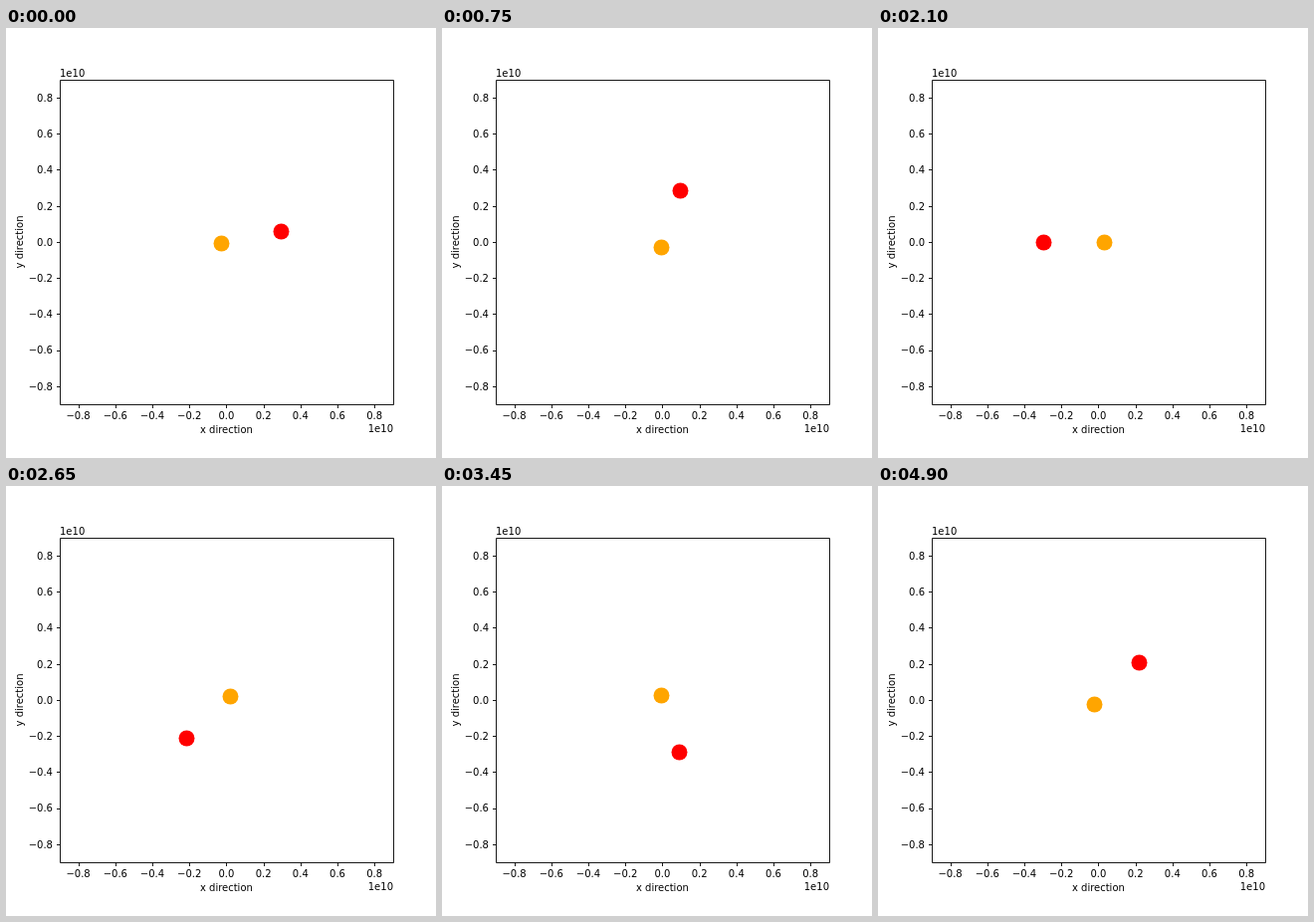
These frames come from a looping animation (432 by 432 pixels, 4950 ms). An HTML page:

```html
<!DOCTYPE html>
<html lang="en">
<head>
<meta charset="utf-8">
<title>Two-body orbit</title>
<style>
  html, body { margin: 0; width: 100%; height: 100%; overflow: hidden; background: #fff; }
  svg { display: block; width: 432px; height: 432px; }
  text { font: 10px "DejaVu Sans", sans-serif; }
  .axes { fill: none; stroke: #000; stroke-width: 0.9; }
</style>
</head>
<body>
<svg viewBox="0 0 432 432">
  <path id="axes" class="axes"/>
  <g id="labels">
    <text x="54" y="49">1e10</text>
    <text x="389" y="406" text-anchor="end">1e10</text>
    <text x="221.4" y="407" text-anchor="middle">x direction</text>
    <text transform="translate(17 215) rotate(-90)" text-anchor="middle">y direction</text>
  </g>
  <circle id="star" r="8" fill="orange"/>
  <circle id="planet" r="8" fill="red"/>
</svg>
<script>
const CENTER = { x: 221.4, y: 214.92 };
const SCALE = { x: 185.8, y: 180.8 };
const STEP = 50, STEPS = 99;
const $ = id => document.getElementById(id);
const rad = deg => deg * Math.PI / 180;
const snap = v => Math.floor(v + 0.5) + 0.5;

function addLabel(x, y, anchor, text) {
  const el = document.createElementNS($("labels").namespaceURI, "text");
  el.setAttribute("x", x);
  el.setAttribute("y", y);
  el.setAttribute("text-anchor", anchor);
  el.textContent = text;
  $("labels").append(el);
}

function drawAxes() {
  let path = "M54.5 52.5H389.5V378.5H54.5Z";
  for (let i = -4; i <= 4; i++) {
    const x = CENTER.x + i * 37.2, y = CENTER.y - i * 36.22;
    const text = (i < 0 ? "\u2212" : "") + Math.abs(i * 0.2).toFixed(1);
    path += `M${snap(x)} 378.5v3.5M54.5 ${snap(y)}h-3.5`;
    addLabel(x, 393, "middle", text);
    addLabel(47, Math.round(y + 3.8), "end", text);
  }
  $("axes").setAttribute("d", path);
}

// Bodies sit on whole pixels, on opposite sides of the centre of mass.
function place(id, radius, angle) {
  $(id).setAttribute("cx", snap(CENTER.x + SCALE.x * radius * Math.cos(angle)));
  $(id).setAttribute("cy", snap(CENTER.y - SCALE.y * radius * Math.sin(angle)));
}

function render(now) {
  const step = Math.floor(now / STEP) % STEPS;
  const mean = 11.9 + 4 * step;
  const angle = rad(mean - 0.4 * Math.cos(rad(mean + 10)));
  const radius = 0.301 - 0.001 * Math.cos(angle - rad(125));
  place("planet", radius, angle);
  place("star", -0.1 * radius, angle);
}

const start = performance.now();
function tick() {
  render(performance.now() - start);
  requestAnimationFrame(tick);
}

drawAxes();
tick();
</script>
</body>
</html>
```
